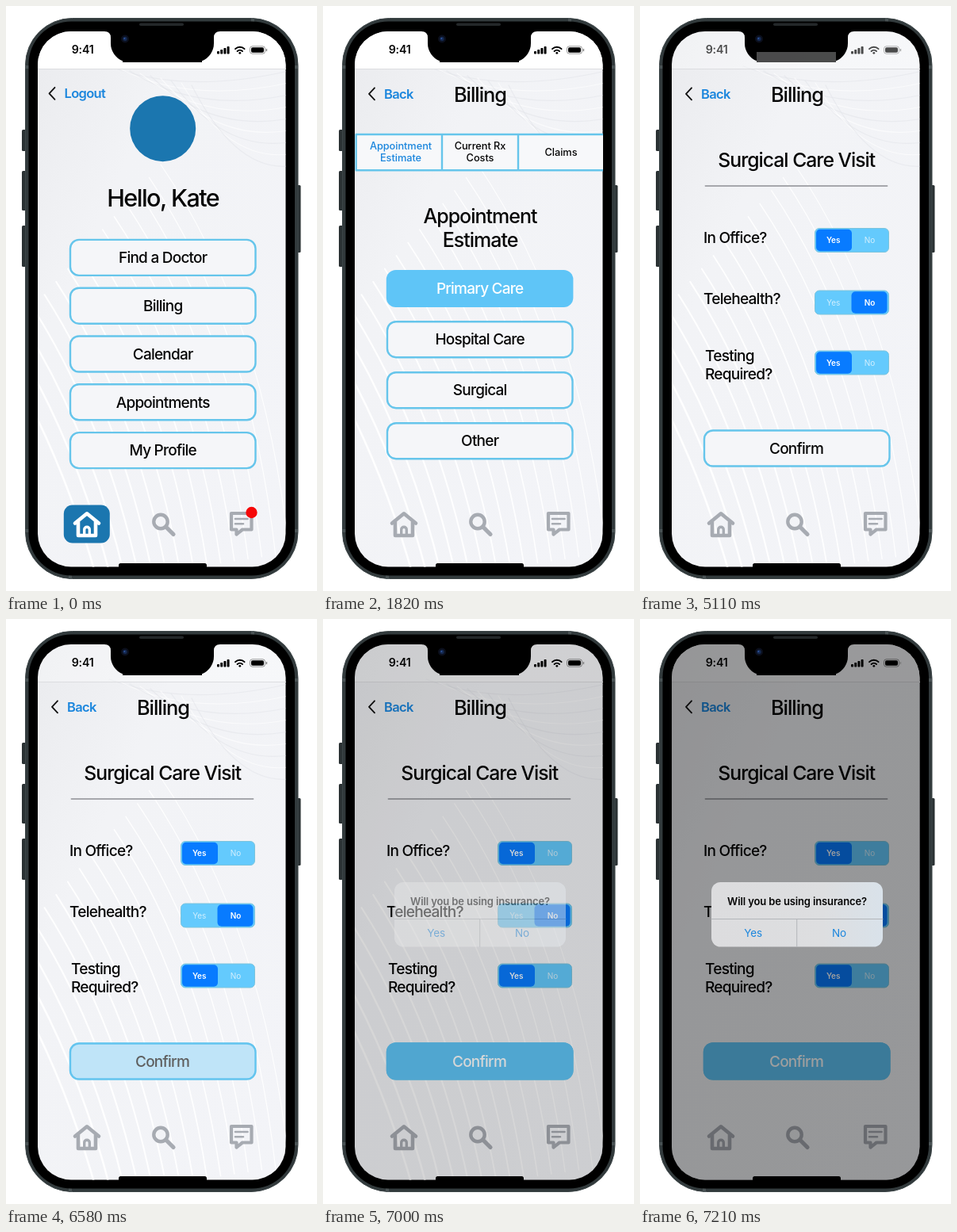
These frames come from a looping animation (392 by 738 pixels, 8 s). An HTML page:

```html
<!DOCTYPE html>
<html lang="en">
<head>
<meta charset="utf-8">
<title>Clinic app</title>
<style>
  html, body { margin: 0; width: 100%; height: 100%; overflow: hidden; background: #fff; }
  svg { display: block; width: 392px; height: 738px; font-family: Inter, "Open Sans", sans-serif; }
  .line { fill: none; stroke-linecap: round; stroke-linejoin: round; }
</style>
</head>
<body>
<svg viewBox="0 0 392 738">
  <defs>
    <clipPath id="screenClip"><rect x="40" y="32" width="312.5" height="675.5" rx="42"/></clipPath>
    <linearGradient id="paper" x2="1" y2="1">
      <stop offset="0" stop-color="#eaebee"/><stop offset=".3" stop-color="#f2f3f6"/>
      <stop offset="1" stop-color="#f3f4f8"/>
    </linearGradient>
    <linearGradient id="glassA" y2="1" x2=".2">
      <stop offset="0" stop-color="#cbdbe3"/><stop offset=".6" stop-color="#d5dde2"/>
      <stop offset="1" stop-color="#dddee0"/>
    </linearGradient>
    <linearGradient id="glassB">
      <stop offset="0" stop-color="#dcdcde"/><stop offset=".65" stop-color="#dddee0"/>
      <stop offset="1" stop-color="#d9e2ea"/>
    </linearGradient>
  </defs>
  <g id="body"></g>
  <g clip-path="url(#screenClip)">
    <rect x="40" y="32" width="313" height="676" fill="url(#paper)"/>
    <g id="waves" class="line"></g>
    <rect id="statusFill" x="40" y="32" width="313" height="47" fill="#fff"/>
    <path d="M40 79.5H353" stroke="#dcdde0"/>
    <g id="nav"></g>
    <g id="home"></g>
    <g id="billing"></g>
    <g id="surgical"></g>
    <rect id="dim" x="40" y="32" width="313" height="676"/>
    <g id="status"></g>
    <g id="specialist"></g>
    <g id="insurance"></g>
    <rect x="142" y="703" width="111" height="8" rx="2.5"/>
  </g>
  <g id="notch"></g>
</svg>
<script>
const BLUE = '#66c5eb', FILL = '#5fc5f7', NAVY = '#1b76af', GREY = '#a7abb2', LINK = '#1b86dd';
const LOOP = 8000;
const $ = id => document.getElementById(id);
const put = (id, ...parts) => { $(id).innerHTML += parts.join(''); };

const text = (x, y, size, str, o = {}) => {
  const { fill = '#050505', weight = 500, anchor = 'middle', track = -0.04 } = o;
  return `<text x="${x}" y="${y}" font-size="${size}" fill="${fill}" font-weight="${weight}"
    text-anchor="${anchor}" letter-spacing="${track * size}">${str}</text>`;
};
const rect = (x, y, w, h, r, fill, extra = '') =>
  `<rect x="${x}" y="${y}" width="${w}" height="${h}" rx="${r}" fill="${fill}" ${extra}/>`;
const line = (d, stroke, width, extra = '') =>
  `<path class="line" d="${d}" stroke="${stroke}" stroke-width="${width}" ${extra}/>`;
const dot = (x, y, r, fill) => `<circle cx="${x}" cy="${y}" r="${r}" fill="${fill}"/>`;

const outlined = (y, label, cx = 197.7) =>
  rect(81, y + 1.2, 233.5, 45, 11, '#f5f6f9', `stroke="${BLUE}" stroke-width="2.4"`) +
  text(cx, y + 30.4, 19, label);
const filled = (y, label, cx = 197.7) =>
  rect(79.8, y, 235.6, 47, 12, FILL) + text(cx, y + 30.4, 19, label, { fill: '#fff' });
const back = (x, y, label) =>
  line(`M${x} ${y - 7.5}l-7 7.5l7 7.5`, '#111', 1.8) +
  text(x + 12, y + 5.8, 16.5, label, { fill: LINK, weight: 600, anchor: 'start' });
const house = color =>
  line('M87 652.5L102 640.3L117 652.5M91 650.5V668H113V650.5', color, 4.6) +
  line('M98.7 667V660.5a3.3 3.3 0 0 1 6.6 0V667', color, 3.4);

// Phone body
put('body',
  [[20, 156, 27], [20, 208, 50], [20, 277, 52], [366, 226, 85]]
    .map(([x, y, h]) => rect(x, y, 5.5, h, 1.5, '#2b3234')).join(''),
  rect(24.5, 15.5, 343.5, 707, 59, '#323a3c', 'stroke="#3c4547"'),
  [[24, 75], [363, 75], [24, 660], [363, 660]]
    .map(([x, y]) => rect(x, y, 5, 4, 0, '#4a5355')).join(''),
  [[309, 15], [79, 718]].map(([x, y]) => rect(x, y, 4, 5, 0, '#4a5355')).join(''),
  rect(28.5, 19.5, 335.5, 699, 54, '#000'));

// Background: a fan of white curves, with faint ridges above
const mix = (a, b, u) => a + (b - a) * u;
const COUNT = 15;
for (let i = 0; i < COUNT; i++) {
  const u = i / (COUNT - 1);
  put('waves', line(
    `M${mix(-10, 195, u)} ${mix(430, 200, u)}Q${mix(70, 325, u)} ${mix(560, 390, u)} ${mix(115, 357, u)} ${mix(725, 690, u)}`,
    '#fff', mix(2.6, 1.1, u), 'opacity=".9"'));
  if (i < 9) put('waves', line(
    `M${130 + i * 13} ${76 + i * 3}Q${225 + i * 8} ${112 + i * 12} 356 ${82 + i * 15}`,
    i % 2 ? '#fff' : '#e3e5e9', 1.2, 'opacity=".6"'));
}

// Status bar
put('status',
  rect(147, 32, 100, 39, 0, '#000'),
  text(96.7, 60.3, 14.2, '9:41', { weight: 600, track: -0.01 }),
  [0, 1, 2, 3].map(i => rect(266 + i * 4.2, 57 - i * 2, 3, 3.5 + i * 2, 0.8, '#000')).join(''),
  line('M289 54.2a8.2 8.2 0 0 1 11.6 0M291.6 57a4.6 4.6 0 0 1 6.4 0', '#000', 1.9),
  dot(294.8, 59.3, 1.4, '#000'),
  rect(307.5, 50.8, 19, 9.4, 3, 'none', 'stroke="#000" stroke-opacity=".4"'),
  rect(309, 52.3, 16, 6.4, 1.8, '#000'),
  rect(327.8, 54, 1.3, 3.2, 0.6, '#777'));

put('notch',
  '<path d="M124 30H270V32Q262 32 262 40V47A24 24 0 0 1 247 69.3V58H147V69.3A24 24 0 0 1 132 47V40Q132 32 124 32Z"/>',
  rect(168, 21.5, 56, 3.6, 1.8, '#24282a'),
  dot(150, 41.5, 5, '#0b0f1c'), dot(150, 41.5, 2.7, '#14284f'), dot(149.4, 41, 1, '#2f56a0'));

put('nav',
  house(GREY),
  `<circle class="line" cx="195" cy="650.5" r="8.7" stroke="${GREY}" stroke-width="4.4"/>`,
  line('M202 657.5L211 666.5', GREY, 5.2),
  line('M284 640H309.5V660.5H298L290.5 666.5V660.5H284Z', GREY, 4.2),
  line('M289 647H304.5M289 653.3H299', GREY, 2.6));

// Home
put('home',
  back(61.5, 110.3, 'Logout'),
  dot(197.7, 154.7, 41.5, NAVY),
  text(197.7, 253, 30.5, 'Hello, Kate', { track: -0.05 }),
  ['Find a Doctor', 'Billing', 'Calendar', 'Appointments', 'My Profile']
    .map((label, i) => outlined(293.7 + i * 60.8, label)).join(''),
  `<g id="billingPressed">${filled(354.5, 'Billing')}</g>`,
  rect(72.8, 629.5, 58, 48, 11, NAVY), house('#fff'),
  dot(309.5, 639, 7.2, '#f60808'));

// Billing
const tab = { track: -0.005 };
const activeTab = { ...tab, fill: LINK };
put('billing',
  back(65, 110.8, 'Back'), text(198, 121, 25.4, 'Billing'),
  rect(41, 162, 313, 45, 0, '#f7f8fa'),
  line('M353 162H41.7V207.3H353M150 162V207M246 162V207', BLUE, 2.4),
  text(98, 181, 12.8, 'Appointment', activeTab), text(98, 196, 12.8, 'Estimate', activeTab),
  text(198, 181, 12.8, 'Current Rx', tab), text(198, 196, 12.8, 'Costs', tab),
  text(300, 189, 12.8, 'Claims', tab),
  text(198, 273.5, 25, 'Appointment'), text(198, 304, 25, 'Estimate'),
  filled(333, 'Primary Care'),
  ['Hospital Care', 'Surgical', 'Other'].map((label, i) => outlined(397 + i * 64, label)).join(''));

// Surgical visit
const toggle = (y, yes) =>
  rect(220.5, y + 0.5, 93, 30, 5.5, '#64cafd', 'stroke="#7cc4dc"') +
  rect(yes ? 222 : 266.5, y + 1.7, 45, 27.6, 5, '#087bff') +
  ['Yes', 'No'].map((label, i) => text(243.7 + i * 45.8, y + 19.3, 10, label,
    { fill: yes !== !!i ? '#fff' : '#d3effd', weight: yes !== !!i ? 600 : 400, track: 0 })).join('');
const question = (x, y, label) => text(x, y, 19.1, label, { anchor: 'start' });
put('surgical',
  back(65, 110.8, 'Back'), text(198, 121, 25.4, 'Billing'),
  text(197.3, 203.3, 24.7, 'Surgical Care Visit'),
  line('M82.5 227H311.5', '#a6a7ac', 1.8),
  question(80, 299.3, 'In Office?'), toggle(280, true),
  question(80, 376.3, 'Telehealth?'), toggle(358.5, false),
  question(82, 448, 'Testing'), question(82, 471.3, 'Required?'), toggle(434.5, true),
  outlined(534.3, 'Confirm', 197),
  `<g id="confirmPressed">${filled(534.3, 'Confirm', 197)}</g>`);

// Alerts
const panel = fill => rect(90, 332, 216, 81.5, 11.5, fill);
const alertText = (title, noWeight, track) =>
  line('M90 378.5H306M197.7 378.5V413.5', '#b3b6ba', 1) +
  text(198, 361, 13, title, { weight: 600, track }) +
  text(142.7, 401.2, 13.5, 'Yes', { fill: LINK, weight: 400, track: -0.01 }) +
  text(251, 401.2, 13.5, 'No', { fill: LINK, weight: noWeight, track: -0.01 });
put('specialist', panel('url(#glassA)'), alertText('Specialist Required?', 600, 0));
put('insurance', panel('url(#glassB)'), `<g id="sheen">${panel('#fff')}</g>`,
  alertText('Will you be using insurance?', 400, -0.01));

// Each track lists [time, opacity]; a value holds until the next entry
const tracks = {
  home: [[0, 1], [1750, 0.15], [1820, 0]],
  billingPressed: [[0, 0], [980, 1]],
  billing: [[0, 0], [1750, 0.85], [1820, 1], [5110, 0]],
  specialist: [[0, 0], [2730, 1], [5110, 0]],
  surgical: [[0, 0], [5110, 1]],
  statusFill: [[0, 1], [2730, 0.3]],
  status: [[0, 1], [5110, 0.7], [5180, 1]],
  confirmPressed: [[0, 0], [6580, 0.36], [6650, 0.54], [6720, 0.71], [6790, 0.87], [6860, 1]],
  dim: [[0, 0], [2730, 0.39], [5110, 0], [7000, 0.157], [7070, 0.24], [7140, 0.32], [7210, 0.38]],
  insurance: [[0, 0], [7000, 0.46], [7070, 0.68], [7140, 0.86], [7210, 1]],
  sheen: [[0, 0], [7000, 0.35], [7070, 0.2], [7140, 0.1], [7210, 0]],
  waves: [[0, 1], [2730, 0.6], [5110, 1], [7070, 0.6], [7140, 0.3], [7210, 0]]
};
for (const [id, steps] of Object.entries(tracks)) {
  const frames = steps.map(([time, opacity]) => ({ offset: time / LOOP, opacity, easing: 'step-end' }));
  frames.push({ offset: 1, opacity: steps.at(-1)[1] });
  $(id).animate(frames, { duration: LOOP, iterations: Infinity });
}
</script>
</body>
</html>
```
